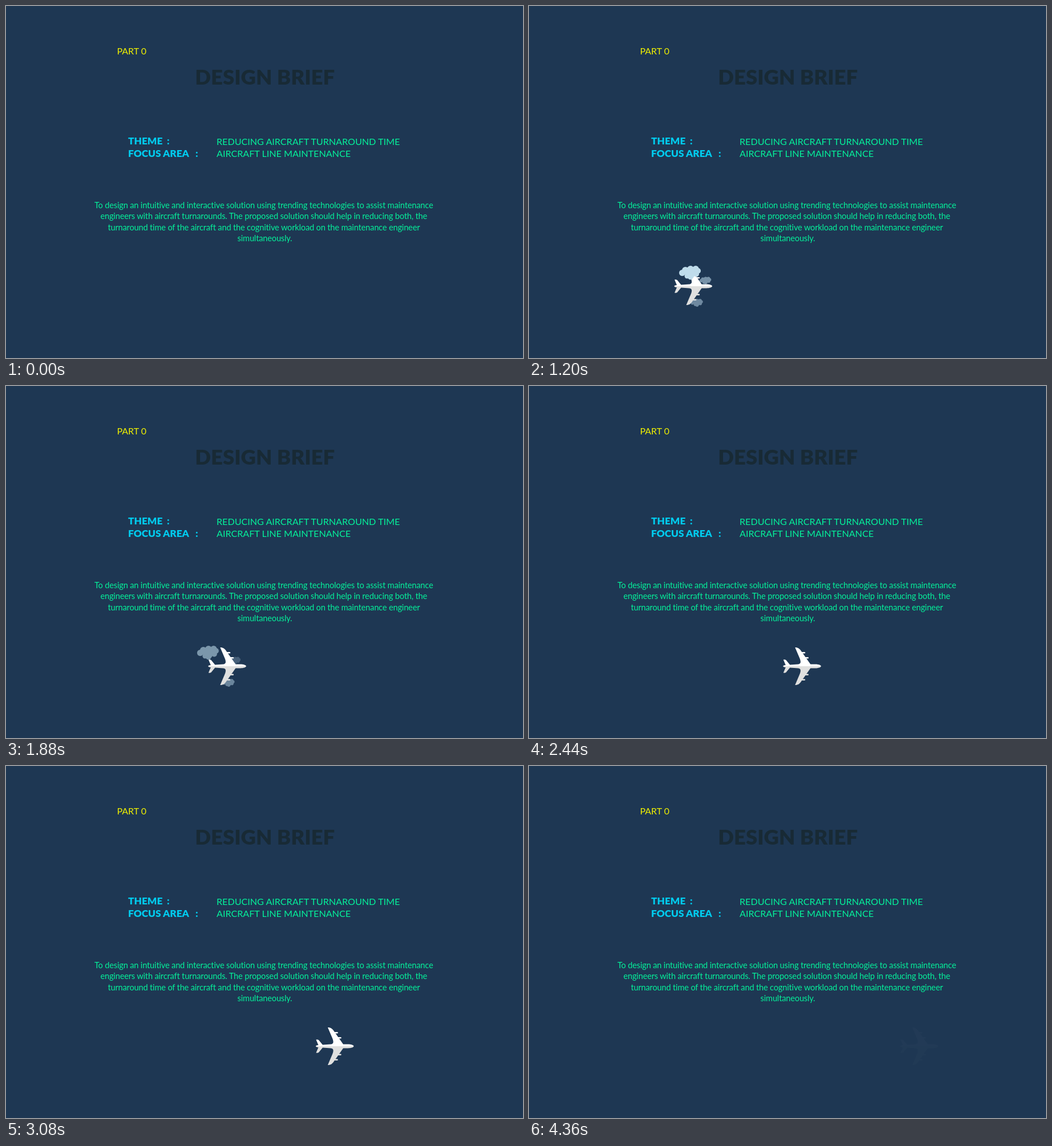
These frames come from a looping animation (906 by 618 pixels, 4.48 s). An HTML page:

```html
<!DOCTYPE html>
<html lang="en">
<head>
<meta charset="utf-8">
<title>Design brief</title>
<style>
  html, body { margin: 0; width: 100%; height: 100%; overflow: hidden; background: #1e3753; }
  svg { display: block; width: 906px; height: 618px; font-family: Lato, "Open Sans", sans-serif; }
  .part { font-size: 16px; fill: #f0f000; }
  .title { font-size: 36.5px; font-weight: 900; fill: #182a35; text-anchor: middle; }
  .label { font-size: 17.3px; font-weight: 900; fill: #00cbee; }
  .value { font-size: 16.12px; fill: #05f09a; }
  .body { font-size: 14.6px; letter-spacing: -.17px; fill: #05f09a; text-anchor: middle; }
</style>
</head>
<body>
<svg viewBox="0 0 906 618">
  <defs>
    <g id="half">
      <path d="M0 0C0-2-5-3.4-10-3.4L-18.5-3.6L-34-25.5C-37-30.5-40-33-45.5-33L-37-13C-35-7-35.5-4-40-3.6L-54.5-2.6L-61.5-11Q-63.5-12-66-11.5L-62-2Q-66.5-1.5-66.5 0Z"/>
      <rect x="-34" y="-25" width="6.3" height="2.5" rx="1.2"/>
      <rect x="-28" y="-16" width="6.2" height="2.5" rx="1.2"/>
    </g>
    <g id="cloud">
      <circle cx="-13.5" cy="0.5" r="5.5"/>
      <circle cx="-8" cy="-4" r="6"/>
      <circle cx="1" cy="-6" r="6"/>
      <circle cx="10" cy="-6.5" r="5.5"/>
      <circle cx="14" cy="-3" r="5"/>
      <circle cx="11" cy="2.5" r="5"/>
      <circle cx="0" cy="2" r="9"/>
      <circle cx="-5" cy="6" r="4.5"/>
      <circle cx="1" cy="8" r="4.5"/>
    </g>
  </defs>

  <text class="part" x="194.4" y="85">PART 0</text>
  <text class="title" x="453.7" y="138.3">DESIGN BRIEF</text>
  <text class="label" x="214" y="243">THEME</text>
  <text class="label" x="282" y="243">:</text>
  <text class="label" x="214" y="264.8">FOCUS AREA</text>
  <text class="label" x="332" y="264.8">:</text>
  <text class="value" x="369" y="243.6">REDUCING AIRCRAFT TURNAROUND TIME</text>
  <text class="value" x="369" y="265">AIRCRAFT LINE MAINTENANCE</text>
  <text class="body">
    <tspan x="453.5" y="354.7">To design an intuitive and interactive solution using trending technologies to assist maintenance</tspan>
    <tspan x="453.5" y="374.2">engineers with aircraft turnarounds. The proposed solution should help in reducing both, the</tspan>
    <tspan x="453.5" y="393.6">turnaround time of the aircraft and the cognitive workload on the maintenance engineer</tspan>
    <tspan x="453.5" y="413">simultaneously.</tspan>
  </text>

  <use id="mid" href="#cloud" fill="#8aa5ba"/>
  <use id="low" href="#cloud" fill="#8aa5ba"/>
  <g id="plane">
    <use href="#half" fill="#e0e0df" transform="scale(1 -1)"/>
    <use href="#half" fill="#fff"/>
  </g>
  <use id="big" href="#cloud" fill="#bfdceb"/>
</svg>
<script>
  const LOOP = 4480, STEP = 40, LAST = 4360;
  const $ = id => document.getElementById(id);
  const clamp = v => Math.max(0, Math.min(1, v));
  const ramp = (t, a, b) => clamp((t - a) / (b - a));

  // Cloud offsets from the plane's nose and opacities at these times
  const keys = [0, 560, 1200, 1880, 2320];
  const clouds = [
    { el: $('big'), y: 468, size: 1, dx: [13, -11, -39, -67, -85], alpha: [0, .78, 1, .58, 0] },
    { el: $('mid'), y: 482, size: .54, dx: [10, -1, -12, -20, -26], alpha: [0, .41, .83, .37, 0] },
    { el: $('low'), y: 521, size: .56, dx: [-14, -21, -27, -31, -34], alpha: [0, .87, .75, .71, 0] }
  ];

  function between(values, t) {
    let i = 0;
    while (i < keys.length - 2 && t > keys[i + 1]) i++;
    return values[i] + (values[i + 1] - values[i]) * ramp(t, keys[i], keys[i + 1]);
  }

  function place(el, x, y, size, alpha) {
    el.setAttribute('transform', `translate(${x} ${y}) scale(${size})`);
    el.setAttribute('opacity', alpha);
  }

  function draw(now) {
    const t = Math.min(LAST, Math.floor(now % LOOP / STEP) * STEP);
    const s = t / 4440;
    const nose = 234.2 + 483.5 * s * s * (3 - 2 * s);
    place($('plane'), nose, 492, 1, ramp(t, 0, 400) * (1 - ramp(t, 3960, 4366)));
    for (const c of clouds) {
      place(c.el, nose + between(c.dx, t), c.y, c.size, between(c.alpha, t));
    }
  }

  let start;
  function tick(now) {
    start ??= now;
    draw(now - start);
    requestAnimationFrame(tick);
  }
  draw(0);
  requestAnimationFrame(tick);
</script>
</body>
</html>
```
